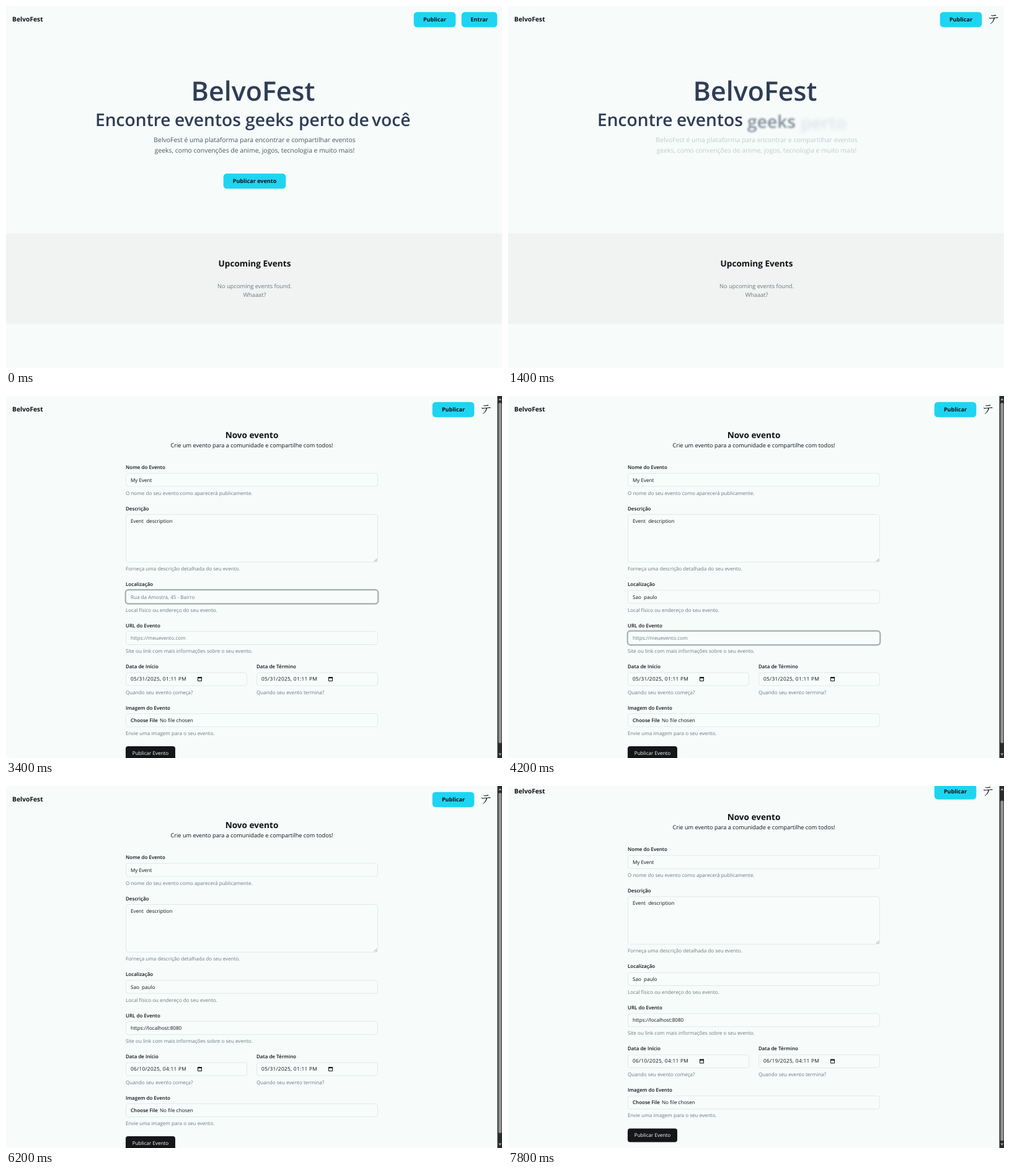
These frames come from a looping animation (800x585 px, 8000 ms). An HTML page:

```html
<!DOCTYPE html>
<html lang="pt">
<head>
<meta charset="utf-8">
<title>BelvoFest</title>
<style>
  html, body { margin: 0; width: 100%; height: 100%; overflow: hidden; background: #f7fcfb; }
  svg { display: block; width: 800px; height: 585px; }
  text {
    font-family: "Open Sans", "Noto Sans", sans-serif;
    white-space: pre;
    text-rendering: geometricPrecision;
  }
  .kana { font-family: "Noto Serif CJK JP", "Noto Sans CJK JP", "Noto Sans CJK", serif; }
</style>
</head>
<body>
<svg id="stage" viewBox="0 0 800 585"></svg>
<script>
const LOOP = 8000, STEP = 200;
const INK = '#0d1013', SLATE = '#2f3d54', MUTED = '#6f787c', CYAN = '#1dd5f1', FIELD = 8.1;
const stage = document.getElementById('stage');
const pen = document.createElement('canvas').getContext('2d');
const clamp = (v, lo = 0, hi = 1) => Math.min(hi, Math.max(lo, v));

const text = (x, y, size, str, { fill = INK, weight = 400, anchor = 'start', extra = '' } = {}) =>
  `<text x="${x}" y="${y}" font-size="${size}" font-weight="${weight}" fill="${fill}" text-anchor="${anchor}" ${extra}>${str}</text>`;
const centered = (x, y, size, str, opts) => text(x, y, size, str, { anchor: 'middle', ...opts });
const rect = (x, y, w, h, fill, r = 0, extra = '') =>
  `<rect x="${x}" y="${y}" width="${w}" height="${h}" rx="${r}" fill="${fill}" ${extra}/>`;
const button = (x, y, w, label) =>
  rect(x - .3, y - .3, w + .6, 24.6, CYAN, 5.5) + centered(x + w / 2, y + 14.8, 9.05, label, { weight: 700 });

// Fades, rises and sharpens its content as p goes from 0 to 1.
const reveal = (p, content, rise = 0, blur = 0) => p >= 1 ? content : p <= 0 ? '' :
  `<g opacity="${p}" transform="translate(0 ${rise * (1 - p)})" style="filter:blur(${blur * (1 - p)}px)">${content}</g>`;

function nav(right, signedIn) {
  const brand = text(10, 25, 10.3, 'BelvoFest', { weight: 700 });
  if (!signedIn) return brand + button(658, 10, 67, 'Publicar') + button(735, 10, 57, 'Entrar');
  return brand + button(right - 103, 10, 67, 'Publicar') +
    centered(right - 17, 27.8, 18.5, 'テ', { extra: 'class="kana"' });
}

const headline = [[144, 'Encontre'], [272, 'eventos'], [386, 'geeks'], [472, 'perto'], [552, 'de'], [590, 'você']];

function home(t) {
  const signedIn = t >= 1000;
  const part = (start, length) => signedIn ? clamp((t - start) / length) : 1;
  const copy = { fill: '#4d5559' };
  return nav(800, signedIn) +
    reveal(part(1000, 220), centered(398.5, 153, 43, 'BelvoFest', { fill: SLATE, weight: 600 }), 6.2, 3.5) +
    headline.map(([x, word], i) => reveal(part(1070 + 100 * i, 220),
      text(x, 194, 28.2, word, { fill: SLATE, weight: 600 }), 6.2, 3.5)).join('') +
    reveal(part(1310, 300),
      centered(401, 220, 10.4, 'BelvoFest é uma plataforma para encontrar e compartilhar eventos', copy) +
      centered(401, 237, 10.4, 'geeks, como convenções de anime, jogos, tecnologia e muito mais!', copy)) +
    reveal(part(1500, 300), button(351, 271, 100, 'Publicar evento')) +
    rect(0, 367.5, 800, 146, '#f0f3f2') +
    centered(401, 421, 13.6, 'Upcoming Events', { weight: 700 }) +
    centered(401, 455.5, 9.3, 'No upcoming events found.', { fill: MUTED }) +
    centered(401, 470, 9.3, 'Whaaat?', { fill: MUTED });
}

// Label, framed box and hint shared by every form row.
function frame(x, y, w, h, label, hint, focused) {
  return text(x, y - 6.5, 8, label, { weight: 600 }) +
    rect(x + .5, y + .5, w - 1, h - 1, '#f8fdfc', 4, 'stroke="#e2e8e8"') +
    (focused ? rect(x - .3, y - .3, w + .6, h + .6, 'none', 4.5, 'stroke="#aaafb0" stroke-width="2.2"') : '') +
    text(x, y + h + 13, FIELD, hint, { fill: MUTED });
}

function input(y, h, label, hint, placeholder, value, focused) {
  pen.font = `${FIELD}px "Open Sans", "Noto Sans", sans-serif`;
  const caret = focused && value ? rect(201.5 + pen.measureText(value).width, y + 6, .9, 10.5, INK) : '';
  return frame(193, y, 407, h, label, hint, focused) +
    text(201, y + 14, FIELD, value || placeholder, { fill: value ? INK : MUTED }) + caret;
}

// k counts edits: month, day, then hour.
function dateInput(x, label, hint, day, k) {
  const focused = k >= 0 && k < 4, seg = Math.min(k, 2);
  const parts = [k > 0 ? '06' : '05', '/', k > 1 ? day : '31', '/2025, ', k > 2 ? '04' : '01', ':11 PM'];
  const str = parts.map((p, i) => focused && i === seg * 2 ? `<tspan fill="#fff">${p}</tspan>` : p).join('');
  return frame(x, 446.5, 196, 22, label, hint, focused) +
    (focused ? rect(x + 7.8 + [0, 13.4, 51.8][seg], 451, 10.8, 11.5, '#2b63c6') : '') +
    text(x + 8, 460, 8.3, str, { extra: 'letter-spacing=".3"' }) +
    `<path d="M${x + 116.5} 455.2h6v5.3h-6z" fill="none" stroke="${INK}"/>` +
    rect(x + 116, 454, 7, 2.2, INK);
}

function popup(alpha) {
  return alpha <= 0 ? '' : `<g opacity="${alpha}"><path d="M261 408l5-5.5 5 5.5z" fill="#2b2e2f"/>` +
    rect(254, 407, 126, 26.5, '#2b2e2f', 2) +
    text(262, 423, 9.2, 'https://localhost:8080', { fill: '#fff' }) + '</g>';
}

function scrollbar(scroll) {
  return rect(792.5, 0, 7.5, 585, '#2b2b2c') + rect(794.3, 11 + scroll, 5, 550, '#929394', 2.5) +
    '<path d="M794.3 7l2.5-3.5 2.5 3.5zM794.3 577.5l2.5 3.5 2.5-3.5z" fill="#a5a6a7"/>';
}

function form(t) {
  const typed = (str, start, length) => str.slice(0, Math.round(str.length * clamp((t - start) / length)));
  const within = (from, to) => t >= from && t < to;
  const scroll = clamp((t - 7000) / 40, 0, 12.6);
  return `<g transform="translate(0 ${-scroll})">` + nav(791, true) +
    centered(396.5, 67.5, 13.6, 'Novo evento', { weight: 700 }) +
    centered(396.5, 82.5, 9.2, 'Crie um evento para a comunidade e compartilhe com todos!') +
    input(124.5, 22, 'Nome do Evento', 'O nome do seu evento como aparecerá publicamente.', 'Meu Evento',
      typed('My Event', 1800, 550), within(1800, 2600)) +
    input(191, 78, 'Descrição', 'Forneça uma descrição detalhada do seu evento.', 'Digite os detalhes do seu evento...',
      typed('Event  description', 2600, 600), within(2600, 3400)) +
    '<path d="M594 267.5l4.5-4.5M597 267.5l1.5-1.5" stroke="#686d6f" stroke-width=".8"/>' +
    input(313.5, 22, 'Localização', 'Local físico ou endereço do seu evento.', 'Rua da Amostra, 45 - Bairro',
      typed('Sao  paulo', 3400, 600), within(3400, 4200)) +
    input(380, 22, 'URL do Evento', 'Site ou link com mais informações sobre o seu evento.', 'https://meuevento.com',
      typed('https://localhost:8080', 4200, 800), within(4200, 5400)) +
    dateInput(193, 'Data de Início', 'Quando seu evento começa?', '10', (t - 5400) / STEP) +
    dateInput(404, 'Data de Término', 'Quando seu evento termina?', '19', (t - 6400) / STEP) +
    frame(193, 513, 407, 22, 'Imagem do Evento', 'Envie uma imagem para o seu evento.') +
    text(201, 527, 8, 'Choose File', { weight: 600 }) + text(248, 527, FIELD, 'No file chosen') +
    rect(193, 566, 80, 22, '#151617', 4) +
    centered(233, 579.5, FIELD, 'Publicar Evento', { fill: '#fff', weight: 500 }) +
    (within(4400, 5600) ? popup(clamp(1 - (t - 5200) * .00175)) : '') +
    '</g>' + scrollbar(scroll);
}

let shown = -1;
const begin = performance.now();
function draw(now) {
  // The screen refreshes in steps; the small lead absorbs timer jitter.
  const t = Math.floor(((Math.max(0, now - begin) + 20) % LOOP) / STEP) * STEP;
  if (t !== shown) {
    stage.innerHTML = t < 1800 ? home(t) : form(t);
    shown = t;
  }
  requestAnimationFrame(draw);
}
draw(begin);
</script>
</body>
</html>
```
